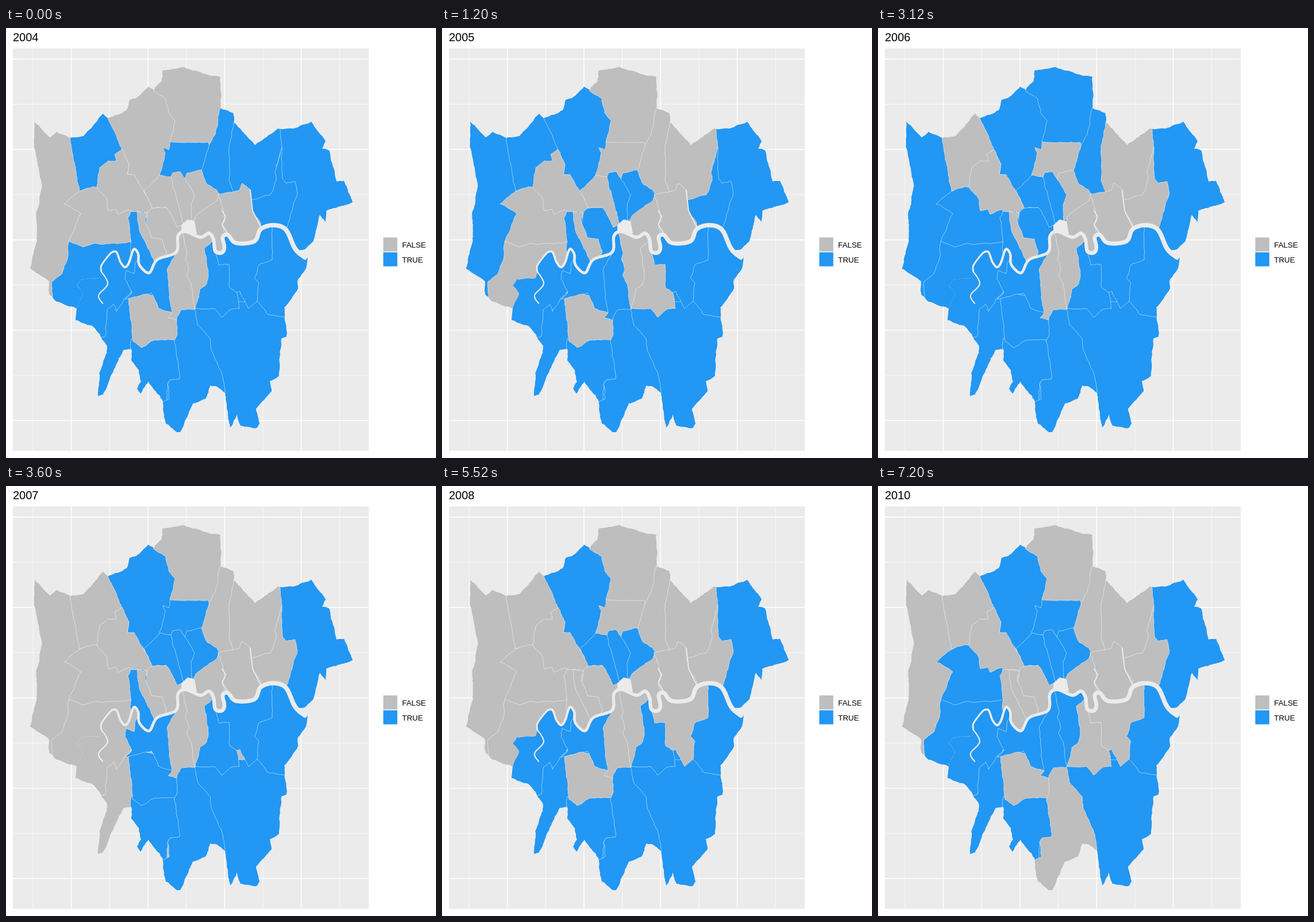
Recreate the animation shown at these times as an HTML page. Size 748 by 748 pixels, loop 8000 ms.

```html
<!DOCTYPE html>
<html lang="en">
<head>
<meta charset="utf-8">
<title>Map by year</title>
<style>
  html, body { margin: 0; width: 100%; height: 100%; overflow: hidden; background: #fff; }
  svg { display: block; width: 100vw; height: 100vh; }
  text { font-family: "Liberation Sans", Arial, sans-serif; font-size: 13.33px; }
  #year { font-size: 20px; }
  #grid { stroke: #fff; }
  .area { fill: #bebebe; stroke: #fff; stroke-width: .5; stroke-linejoin: round; }
  .area.on { fill: #2297f3; }
  #north { clip-path: url(#northClip); }
  #south { clip-path: url(#southClip); }
  #water { fill: none; stroke: #ebebeb; stroke-width: 1.8; stroke-linecap: round; }
</style>
</head>
<body>
<svg viewBox="0 0 748 748">
  <clipPath id="northClip"><polygon/></clipPath>
  <clipPath id="southClip"><polygon/></clipPath>
  <text id="year" x="12" y="23">2004</text>
  <rect x="12" y="35.5" width="619" height="700" fill="#ebebeb"/>
  <g id="grid"></g>

  <!-- Areas are cut to the land; later ones cover the loose edges of earlier ones -->
  <g id="south">
    <polygon class="area" data-on="TTTFTTT"/>
    <polygon class="area" data-on="TTTFTFT" points="100,560 173,536 176,490 187,480 192,493 217,460 240,440 240,370 100,370"/>
    <polygon class="area" data-on="TTTTTTT" points="218,540 310,540 310,610 286,612 281,620 280,660 210,660"/>
    <polygon class="area" data-on="FFTTFFF" points="213,473 220,455 300,480 310,520 295,542 258,543 235,556 221,545 216,500"/>
    <polygon class="area" data-on="TTTTTTT" points="209,422 223,427 224,413 235,395 310,380 300,500 265,487 253,461 207,472 219,460 207,437"/>
    <polygon class="area" data-on="FTFFFTT" points="296,390 280,422 289,496 282,504 296,508 335,500 325,345 295,345"/>
    <polygon class="area" data-on="FFFFFFT" points="306,345 315,390 312,402 318,420 314,430 322,445 328,495 360,470 370,345"/>
    <polygon class="area" data-on="TTTTTTF" points="297,508 306,490 345,490 390,640 390,720 270,720 272,650 284,645 281,620 286,612 302,610 293,543 298,532"/>
    <polygon class="area" data-on="TTTTTTT" points="328,490 338,480 500,470 500,720 388,720 381,635 375,600 357,560 355,540 333,515"/>
    <polygon class="area" data-on="TFTTTTF" points="345,383 362,370 400,410 401,460 406,488 390,490 375,503 363,488 329,488 337,455 347,448 352,432"/>
    <polygon class="area" data-on="TTTTFFF" points="364,389 362,340 470,330 475,480 437,475 422,488 407,458 401,460 389,452 388,411 370,412"/>
    <polygon class="area" data-on="TTTTTTT" points="462,330 550,380 550,510 474,502 455,498 437,475 440,445 432,435 440,412 463,403"/>
  </g>
  <g id="north">
    <polygon class="area" data-on="FTTFFTF"/>
    <polygon class="area" data-on="TFTFFTT" points="109,371 107,402 97,428 80,441 80,500 260,500 230,350"/>
    <polygon class="area" data-on="TTFFFTF" points="112,191 128,284 230,270 177,140 110,140"/>
    <polygon class="area" data-on="FFTFFFF" points="250,60 400,60 400,230 250,230"/>
    <polygon class="area" data-on="TFFFFFF" points="380,130 490,130 490,310 380,310"/>
    <polygon class="area" data-on="TFFTFFT" points="260,198 352,199 370,270 260,270"/>
    <polygon class="area" data-on="TTTTTTT" points="473,140 480,208 470,240 495,400 620,400 620,140"/>
    <polygon class="area" data-on="TTFFFFF" points="480,208 468,250 470,265 460,290 426,299 420,360 485,360 507,287 503,267 487,270 481,262"/>
    <polygon class="area" data-on="TFTFFFF" points="373,139 364,185 354,202 340,247 345,300 400,300 389,268 388,212 396,165 400,140"/>
    <polygon class="area" data-on="FTTTTFT" points="177,157 214,237 211,255 255,300 267,256 277,218 273,208 283,212 294,161 283,148 278,123 257,110 250,80 175,80"/>
    <polygon class="area" data-on="FFFFFFF" points="202,211 214,237 211,255 223,255 260,320 180,335 150,290 158,277 163,243 178,231 192,231 189,220"/>
    <polygon class="area" data-on="FFTFFFT" points="128,284 150,276 158,277 175,297 178,318 191,315 195,324 214,316 235,330 217,372 158,375 135,381 109,371 130,323 101,306"/>
    <polygon class="area" data-on="TTTTFTF" points="217,319 240,319 275,405 240,440 217,390 217,368 212,330"/>
    <polygon class="area" data-on="FTTFFFF" points="254,313 300,310 320,340 290,410 240,360 246,320"/>
    <polygon class="area" data-on="FFFFFFF" points="228,319 246,322 242,335 253,365 272,367 279,390 262,415 232,352"/>
    <polygon class="area" data-on="FTTTTFT" points="287,259 290,252 303,250 335,292 330,335 309,342 280,290"/>
    <polygon class="area" data-on="FFTTTTT" points="267,256 287,259 309,341 298,347 279,312 254,313 240,283"/>
    <polygon class="area" data-on="FTFTTTT" points="340,247 350,272 366,281 380,300 323,335 322,308 328,290 311,262 315,252"/>
    <polygon class="area" data-on="FFFFFFF" points="369,289 390,300 390,400 360,400 320,370 330,327 367,300"/>
    <polygon class="area" data-on="FFFFFFF" points="369,289 405,283 411,270 424,280 429,318 443,340 443,390 386,380 376,342 381,333"/>
  </g>

  <polygon points="305,343 316,333 328,336 332,358 305,356" fill="#ebebeb"/>
  <g id="water">
    <path d="M376 318L382 328 376 342 386 358"/>
    <path d="M425 282L429 318 443 346"/>
  </g>

  <rect x="656.3" y="364.3" width="24.4" height="24.4" fill="#bebebe"/>
  <rect x="656.3" y="390.2" width="24.4" height="24.4" fill="#2297f3"/>
  <text x="689" y="382">FALSE</text>
  <text x="689" y="408">TRUE</text>
</svg>
<script>
  const LOOP = 8000, STEP = 1200;
  const $ = s => document.querySelector(s);
  const parse = s => s.trim().split(/\s+/).map(p => p.split(',').map(Number));
  const join = pts => pts.map(p => p.map(v => v.toFixed(1))).join(' ');

  function add(parent, d, width) {
    const path = document.createElementNS('http://www.w3.org/2000/svg', 'path');
    path.setAttribute('d', d);
    path.setAttribute('style', `stroke-width:${width}`);
    $(parent).append(path);
  }

  for (let i = 0; i < 9; i++) {
    add('#grid', `M${47 + 66.65 * i} 35.5v700`, i % 2 ? 1.45 : .75);
    add('#grid', `M12 ${54 + 78.6 * i}h619`, i % 2 ? .75 : 1.45);
  }

  const noise = (x, y) => {
    const n = Math.sin(x * 12.9898 + y * 78.233) * 43758.5453;
    return (n - Math.floor(n)) * 2 - 1;
  };

  // Midpoint displacement; the same edge gives the same result in both directions
  function split(a, b) {
    const len = Math.hypot(b[0] - a[0], b[1] - a[1]);
    if (len < 5) return [a];
    const sx = a[0] + b[0], sy = a[1] + b[1], amp = Math.min(1, len * .08);
    const mid = [sx / 2 + amp * noise(sx, sy), sy / 2 + amp * noise(sy, sx)];
    return [...split(a, mid), ...split(mid, b)];
  }
  const roughen = pts => pts.flatMap((p, i) => i + 1 < pts.length ? split(p, pts[i + 1]) : [p]);

  // Catmull-Rom curve through the points
  function smooth(pts, n = 6) {
    const out = [];
    for (let i = 0; i + 1 < pts.length; i++) {
      const b = pts[i], c = pts[i + 1], a = pts[i - 1] || b, d = pts[i + 2] || c;
      for (let k = 0; k < n; k++) {
        const t = k / n;
        out.push([0, 1].map(j => b[j] + t / 2 * (c[j] - a[j]
          + t * (2 * a[j] - 5 * b[j] + 4 * c[j] - d[j] + t * (3 * (b[j] - c[j]) + d[j] - a[j])))));
      }
    }
    return [...out, pts.at(-1)];
  }

  const northCoast = roughen(parse(`123,488 88,476 75,464 74,440 41,418 53,372 52,325 62,276
    48,205 49,162 76,190 88,180 112,191 135,188 169,149 177,157 210,143 215,125 226,122 247,102
    257,108 271,92 272,74 309,68 345,80 373,85 373,139 395,148 397,165 433,204 473,175 500,175
    531,163 556,197 550,210 562,213 575,267 588,266 603,303 557,318 556,338 546,325 535,370 520,385 507,387`));
  const southCoast = roughen(parse(`524,397 522,418 508,437 508,453 484,486 488,537 479,540
    475,605 459,614 462,632 435,662 441,688 436,696 408,692 402,672 390,695 381,635 365,623
    355,622 347,645 325,653 303,703 297,703 278,688 272,647 248,615 234,636 228,627 235,615
    231,595 218,578 218,558 205,560 169,638 160,641 162,600 175,565 175,552 165,538 150,518 121,508`));
  const border = roughen(parse('123,488 134,461 123,448 130,437 163,435'));
  const river = smooth(parse(`166,424 166,413 180,394 187,389 193,391 199,407 207,416 214,408
    222,385 230,393 232,412 249,426 263,403 296,390 299,362 312,354 338,364 353,357 361,368
    364,388 375,391 380,382 377,364 386,360 400,374 432,371 443,350 465,343 487,351 503,384 520,399`));
  const stream = smooth(parse('168,479 161,465 177,445 166,424'));

  const bank = [...border, ...river];
  const land = {
    north: [...northCoast, ...bank.slice().reverse()],
    south: [...southCoast, ...bank],
  };
  for (const side in land) {
    const pts = join(land[side]);
    $(`#${side}Clip polygon`).setAttribute('points', pts);
    $(`#${side} polygon`).setAttribute('points', pts);
  }

  const areas = [...document.querySelectorAll('.area')];
  for (const area of areas) {
    if (area === area.parentNode.firstElementChild) continue;
    const pts = parse(area.getAttribute('points'));
    area.setAttribute('points', join(roughen([...pts, pts[0]])));
  }

  add('#water', 'M' + join(stream), 2.2);
  for (let i = 1; i < river.length; i++) {
    add('#water', 'M' + join(river.slice(i - 1, i + 1)), 2.6 + 5.4 * i / river.length);
  }

  let shown = -1;
  function draw() {
    const i = Math.floor(performance.now() % LOOP / STEP);
    if (i !== shown) {
      shown = i;
      $('#year').textContent = 2004 + i;
      for (const area of areas) area.classList.toggle('on', area.dataset.on[i] === 'T');
    }
    requestAnimationFrame(draw);
  }
  draw();
</script>
</body>
</html>
```
